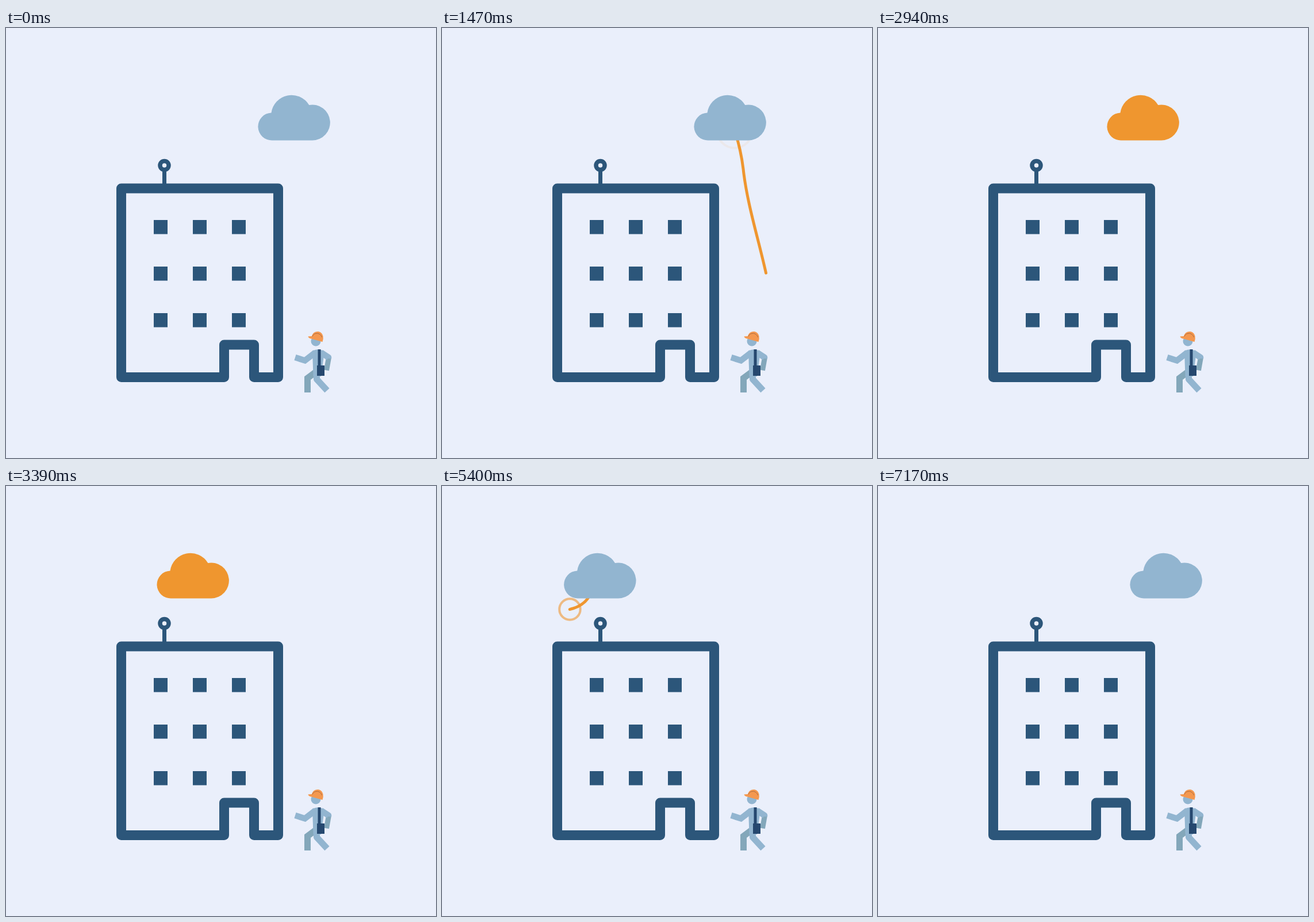
Animation of 748 by 748 pixels, one loop 7200 ms. Source, as an HTML page:

```html
<!DOCTYPE html>
<html lang="en">
<head>
<meta charset="utf-8">
<title>Signal to the cloud</title>
<style>
  html, body { margin: 0; width: 100%; height: 100%; overflow: hidden; background: #eaeffb; }
  svg { display: block; width: 100vw; height: 100vh; }
  .none { fill: none; }
  .navy { stroke: #2c567a; }
  .sky { stroke: #92b5d0; }
  .teal { stroke: #83a7ba; }
  .signal path { fill: none; stroke: #ef962f; stroke-width: 5; stroke-linecap: round; }
  .signal circle { fill: none; stroke: #ef962f; stroke-width: 4; }
</style>
</head>
<body>
<svg viewBox="0 0 748 748">
  <g class="none" stroke-width="10.5">
    <path class="teal" stroke-width="11" d="M538 599L524.5 609V634"/>
    <path class="teal" stroke-width="9" d="M561.5 573L557.5 595.5"/>
    <path class="sky" stroke-linejoin="round" d="M548 564.5L561 573V575"/>
    <path class="sky" d="M538 564.5L520 578.5L503 573"/>
    <path class="sky" stroke-width="11" stroke-linejoin="round" d="M540.5 598V611L558.5 630.5"/>
  </g>
  <path fill="#92b5d0" d="M533 562Q537 559 546 559L554 563L548 606H534.5Z"/>
  <circle cx="539" cy="545" r="8.5" fill="#92b5d0"/>
  <path fill="#f4984f" d="M525.5 536.5L532 536C534 526 549 524.500 551.500 536Q552.500 541 550.500 546L531 540.500Q526 539.500 525.500 536.500Z"/>
  <path class="none" stroke="#a8683c" stroke-width="1" d="M533 536.500C536 529 547 529.500 549.500 538"/>

  <g class="signal" id="up"><path d="M545 592C570 577 581 533 572 472C562 400 532 320 524 245C520 212 512 185 503 160"/><circle/></g>
  <g class="signal" id="down"><path d="M265 165C262 190 250 206 228 213C205 220 189 217 189 207C189 197 205 193 222 200C241 207 255 220 275.500 239"/><circle/></g>

  <g fill="#26486f">
    <rect x="542.5" y="559" width="5" height="29"/>
    <rect x="541" y="587" width="13" height="18"/>
  </g>

  <g class="none navy">
    <path stroke-width="17" stroke-linejoin="round" d="M379.5 607.5H200.500V279H473.500V607.500H431.500V551H379.500Z"/>
    <path stroke-width="7" d="M275.500 248V272"/>
    <circle cx="275.500" cy="239" r="7.500" stroke-width="7.500"/>
  </g>
  <g id="windows" fill="#2c567a"></g>
  <path id="cloud" d="M463.500 195.500A24 24 0 0 1 461.500 147.400A35.600 35.600 0 0 1 527.300 134A31 31 0 1 1 533 195.500Z"/>
</svg>
<script>
  const LOOP = 7200;
  const $ = id => document.getElementById(id);
  const progress = (t, start, dur) => Math.min(1, Math.max(0, (t - start) / dur));
  const cubic = p => p < 0.5 ? 4 * p ** 3 : 1 - 4 * (1 - p) ** 3;
  const ease = (t, start, dur) => cubic(progress(t, start, dur));

  for (let i = 0; i < 9; i++) {
    const pane = document.createElementNS('http://www.w3.org/2000/svg', 'rect');
    const box = { x: 257 + i % 3 * 68, y: 334 + Math.floor(i / 3) * 81, width: 24, height: 24.5 };
    for (const key in box) pane.setAttribute(key, box[key]);
    $('windows').append(pane);
  }

  // head and tail: [start, duration]; fade: when the ripple dies out
  const signals = [
    { id: 'up', head: [0, 1884], tail: [660, 1760], fade: [1380, 120], end: 2340 },
    { id: 'down', head: [4660, 1705], tail: [5443, 1110], fade: [6030, 120], end: LOOP }
  ].map(s => {
    const group = $(s.id), path = group.querySelector('path');
    return { ...s, group, path, ring: group.querySelector('circle'), length: path.getTotalLength() };
  });

  function drawSignal(s, t) {
    const on = t > s.head[0] && t < s.end;
    s.group.style.display = on ? '' : 'none';
    if (!on) return;
    const head = s.length * ease(t, ...s.head);
    const tail = s.length * ease(t, ...s.tail);
    s.path.style.strokeDasharray = `${Math.max(0.01, head - tail)} ${s.length * 2}`;
    s.path.style.strokeDashoffset = -Math.min(tail, s.length - 0.01);

    const rest = 1 - (t - s.head[0]) % 600 / 600;
    const tip = s.path.getPointAtLength(head);
    s.ring.setAttribute('cx', tip.x);
    s.ring.setAttribute('cy', tip.y);
    s.ring.setAttribute('r', 44 * (1 - rest * rest));
    s.ring.setAttribute('opacity', rest * rest * (1 - progress(t, ...s.fade)));
  }

  const blue = [146, 181, 208], orange = [239, 150, 47];

  function draw(t) {
    signals.forEach(s => drawSignal(s, t));
    const x = 226.3 * (ease(t, 5379, 1700) - ease(t, 2340, 1700));
    const warm = progress(t, 1510, 640) - progress(t, 4640, 640);
    const color = blue.map((c, i) => Math.round(c + (orange[i] - c) * warm));
    $('cloud').setAttribute('transform', `translate(${x} 0)`);
    $('cloud').setAttribute('fill', `rgb(${color})`);
  }

  const began = performance.now();
  function tick() {
    draw((performance.now() - began) % LOOP);
    requestAnimationFrame(tick);
  }
  tick();
</script>
</body>
</html>
```
